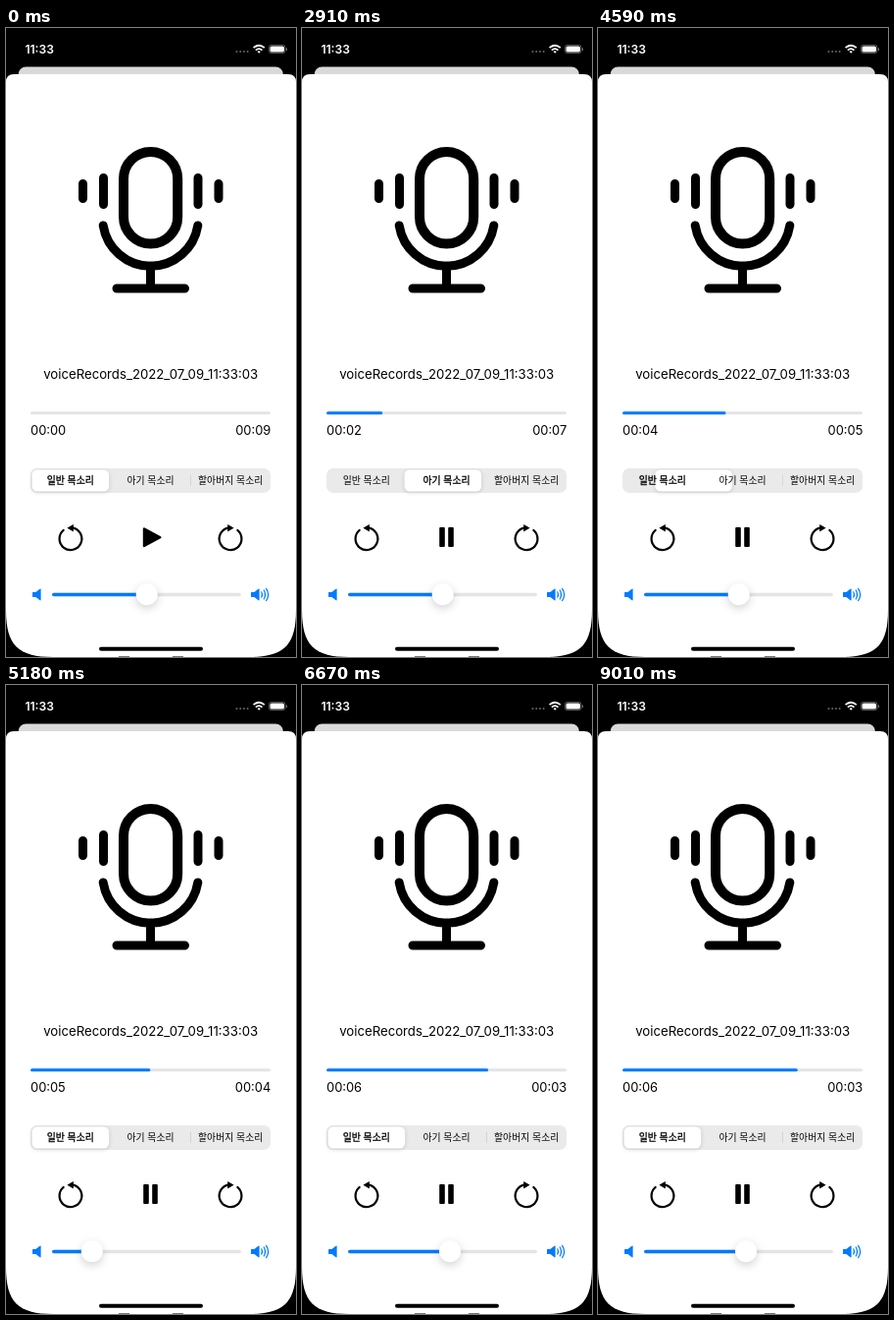
Recreate the animation shown at these times as an HTML page. Size 296x640 px, loop 9110 ms.

```html
<!DOCTYPE html>
<html lang="ko">
<head>
<meta charset="utf-8">
<title>Voice player</title>
<style>
  html, body { margin: 0; width: 100%; height: 100%; overflow: hidden; background: #000; }
  svg { display: block; width: 296px; height: 640px; }
  text { font: 12.9px Inter, Roboto, sans-serif; }
  .clock { font-weight: 600; font-size: 12.1px; fill: #fff; }
  .title { font-size: 13.2px; text-anchor: middle; }
  .seg text { font: 9.9px "Noto Sans CJK KR", "Noto Sans CJK", sans-serif; text-anchor: middle; }
  .seg .on { stroke: #000; stroke-width: .3; }
  .line { fill: none; stroke: #000; stroke-width: 9; stroke-linecap: round; stroke-linejoin: round; }
  .thumb { fill: #fff; filter: drop-shadow(0 1.5px 2px rgba(0, 0, 0, .16)); }
  .knob { fill: #fff; filter: drop-shadow(0 3px 4.5px rgba(0, 0, 0, .18)); }
  .blue { fill: #007aff; }
  .track { fill: #e4e4e6; }
</style>
</head>
<body>
<svg viewBox="0 0 296 640">
  <defs>
    <g id="skip">
      <path d="M2.5-11.1A11.4 11.4 0 1 1-7.4-8.7" fill="none" stroke="#000" stroke-width="2.2" stroke-linecap="round"/>
      <path d="M-3.6-11L2.8-14.8V-7.2Z"/>
    </g>
    <path id="speaker" d="M0-2.6H2.8L7-5.8Q8-6.4 8-5.2V5.2Q8 6.4 7 5.8L2.8 2.6H0Q-.6 2.6-.6 2V-2Q-.6-2.6 0-2.6Z"/>
  </defs>

  <rect width="296" height="640"/>
  <text class="clock" x="19.4" y="26">11:33</text>
  <g fill="#666">
    <circle cx="235.5" cy="24" r="1"/><circle cx="239.2" cy="24" r="1"/>
    <circle cx="242.9" cy="24" r="1"/><circle cx="246.6" cy="24" r="1"/>
  </g>
  <g fill="none" stroke="#fff" stroke-width="1.8">
    <path d="M252.6 20.2Q258.2 15.2 263.8 20.2M254.9 22.6Q258.2 19.7 261.5 22.6"/>
    <path d="M256.6 23.9Q258.2 22.7 259.8 23.9L258.2 25.7Z" fill="#fff" stroke="none"/>
  </g>
  <rect x="268.4" y="17.4" width="16.6" height="8.2" rx="2.4" fill="none" stroke="#707070" stroke-width=".8"/>
  <rect x="269.5" y="18.4" width="14.4" height="6.2" rx="1.5" fill="#fff"/>
  <rect x="285.8" y="20.2" width="1.2" height="2.8" rx=".6" fill="#707070"/>

  <rect x="12.5" y="39.5" width="270.5" height="20" rx="8" fill="#d9d9da"/>
  <path d="M0 55Q0 47 8 47H288Q296 47 296 55V592C296 628 284 640 248 640H48C12 640 0 628 0 592Z" fill="#fff"/>

  <g class="line">
    <rect x="120" y="126" width="55.2" height="93.6" rx="27.6" stroke-width="10" style="stroke-width: 10"/>
    <path d="M99.2 201A48.9 48.9 0 0 0 195.8 201M147.5 242V265M113 265H182.5"/>
    <path d="M99.5 152.5V179.5M78.5 158.5V173.5M196 152.5V179.5M217 158.5V173.5"/>
  </g>

  <text class="title" x="147.7" y="356.5">voiceRecords_2022_07_09_11:33:03</text>

  <rect class="track" x="25" y="390.2" width="245" height="3" rx="1.5"/>
  <rect class="blue" id="fill" x="25" y="390.2" height="3" rx="1.5"/>
  <text id="elapsed" x="25" y="414">00:00</text>
  <text id="remaining" x="270.3" y="414" text-anchor="end">00:09</text>

  <g class="seg">
    <rect x="25" y="448" width="245" height="25" rx="6.8" fill="#eaeaeb"/>
    <rect class="sep" x="106.3" y="455" width=".8" height="11" fill="#cfcfd2"/>
    <rect class="sep" x="188" y="455" width=".8" height="11" fill="#cfcfd2"/>
    <rect class="thumb" id="thumb" y="449.5" width="78.6" height="22" rx="5.3"/>
    <text x="65.8" y="464">일반 목소리</text>
    <text x="147.5" y="464">아기 목소리</text>
    <text x="229.2" y="464">할아버지 목소리</text>
  </g>

  <use href="#skip" transform="translate(66 519.7)"/>
  <use href="#skip" transform="translate(229 519.7) scale(-1 1)"/>
  <path id="play" d="M141 509.5V527L157.3 518.2Z" stroke="#000" stroke-width="2.4" stroke-linejoin="round"/>
  <g id="pause">
    <rect x="140.2" y="508" width="5.6" height="20" rx="1"/>
    <rect x="149.2" y="508" width="5.6" height="20" rx="1"/>
  </g>

  <use class="blue" href="#speaker" x="27.6" y="576.5"/>
  <use class="blue" href="#speaker" x="250.6" y="576.5"/>
  <path d="M260.8 573.8Q262.4 576.5 260.8 579.2M263.2 572Q266 576.5 263.2 581M265.6 570.3Q269.6 576.5 265.6 582.7"
        fill="none" stroke="#007aff" stroke-width="1.2" stroke-linecap="round"/>
  <rect class="track" x="47" y="574.7" width="193" height="3.6" rx="1.8"/>
  <rect class="blue" id="level" x="47" y="574.7" height="3.6" rx="1.8"/>
  <circle class="knob" id="knob" cy="576.3" r="11"/>

  <rect x="95" y="629.8" width="106" height="4" rx="2"/>
  <path d="M115 639.5H126M170 639.5H181" stroke="#777"/>
</svg>

<script>
const LOOP = 9110, LAST = 9010;
const PLAY = 870, SPEED = 0.0287, PX_PER_SECOND = 30, TOTAL = 9;
// Playback pieces: [start time, bar width at that time]
const playback = [[916, 0], [7400, 34], [8016, 0], [8650, 168.5]];
// Segment taps: [time, segment]
const taps = [[2600, 1], [3400, 2], [4337, 0]];
const SLIDE = 400;
// Volume drag: [time, knob centre]
const drag = [[5000, 143.7], [5300, 58], [5400, 58], [5720, 229.5], [5960, 229.5], [6500, 151]];

const $ = id => document.getElementById(id);
const labels = document.querySelectorAll('.seg text');
const seps = document.querySelectorAll('.sep');
const set = (el, name, value) => el.setAttribute(name, value);
const ease = p => p < 0.5 ? 4 * p ** 3 : 1 - 4 * (1 - p) ** 3;
const mix = (a, b, p) => a + (b - a) * p;
const clock = s => '00:' + String(s).padStart(2, '0');
const thumbX = i => 26.5 + i * 81.65;

function progressAt(t) {
  const piece = playback.findLast(([start]) => t >= start);
  return piece ? piece[1] + (t - piece[0]) * SPEED : 0;
}

function segmentAt(t) {
  let from = 0, to = 0, p = 1;
  for (const [time, index] of taps) {
    if (t < time) break;
    from = to;
    to = index;
    p = ease(Math.min(1, (t - time) / SLIDE));
  }
  return { from, to, p };
}

function knobAt(t) {
  if (t <= drag[0][0]) return drag[0][1];
  const next = drag.findIndex(([time]) => t < time);
  if (next < 0) return drag.at(-1)[1];
  const [t0, x0] = drag[next - 1], [t1, x1] = drag[next];
  const p = (t - t0) / (t1 - t0);
  return mix(x0, x1, p * p * (3 - 2 * p));
}

function draw(t) {
  const playing = t >= PLAY;
  set($('play'), 'visibility', playing ? 'hidden' : 'visible');
  set($('pause'), 'visibility', playing ? 'visible' : 'hidden');

  const px = progressAt(t);
  set($('fill'), 'width', playing ? Math.max(4.5, px) : 0);
  const seconds = px > 5 ? Math.ceil(px / PX_PER_SECOND) : 0;
  $('elapsed').textContent = clock(seconds);
  $('remaining').textContent = clock(TOTAL - seconds);

  const { from, to, p } = segmentAt(t);
  set($('thumb'), 'x', mix(thumbX(from), thumbX(to), p));
  labels.forEach((el, i) => el.classList.toggle('on', i === to));
  const clear = (sep, index) => index === sep || index === sep + 1 ? 0 : 1;
  seps.forEach((el, i) => set(el, 'opacity', mix(clear(i, from), clear(i, to), p)));

  const x = knobAt(t);
  set($('knob'), 'cx', x);
  set($('level'), 'width', x - 47);
}

const began = performance.now();
function tick() {
  draw(Math.min(LAST, (performance.now() - began) % LOOP));
  requestAnimationFrame(tick);
}
tick();
</script>
</body>
</html>
```
